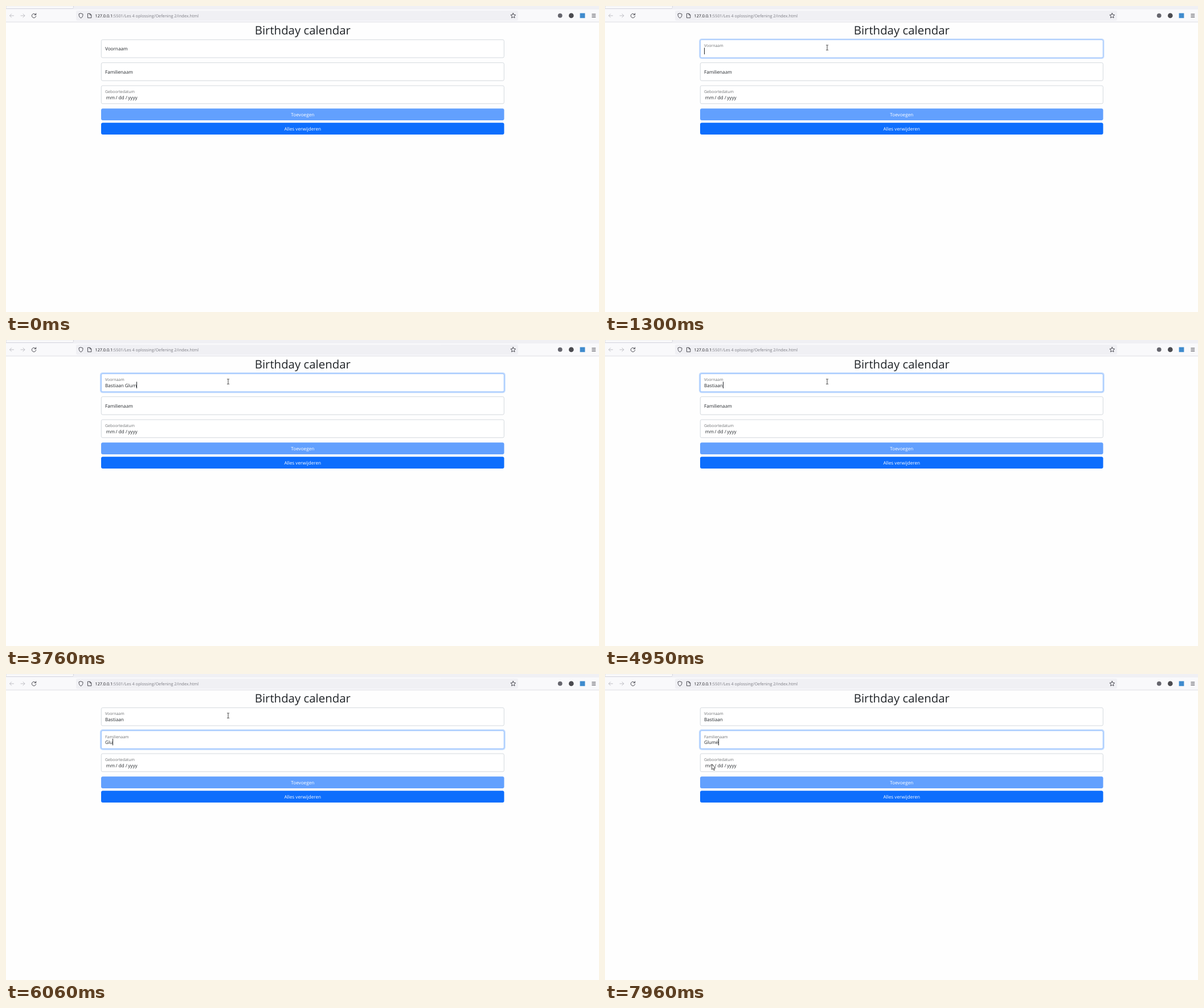
Animation, 1041 px wide and 538 px high, one loop 7.99 s. Source, as an HTML page:

```html
<!DOCTYPE html>
<html lang="nl">
<head>
<meta charset="utf-8">
<title>Birthday calendar</title>
<style>
  html, body { margin: 0; width: 100%; height: 100%; overflow: hidden; background: #fefefe; }
  svg { display: block; width: 100vw; height: 100vh; }
  text {
    font: 8.16px "Open Sans", "Noto Sans", sans-serif;
    fill: #212529;
    white-space: pre;
    text-rendering: geometricPrecision;
  }
  .title { font-size: 20.4px; }
  .url { font-size: 7.25px; fill: #7c7c84; }
  .url .host { fill: #15141a; }
  .mid { text-anchor: middle; }
  .button { fill: #fff; }
  .icon { fill: none; stroke: #4a4a52; stroke-width: 1; stroke-linecap: round; stroke-linejoin: round; }
  .faint { stroke: #bfbfc5; }
</style>
</head>
<body>
<svg id="stage" viewBox="0 0 1041 538" preserveAspectRatio="none">
  <rect width="1041" height="538" fill="#fefefe"/>

  <!-- browser bar -->
  <rect width="1041" height="6" fill="#f0f0f4"/>
  <rect y="6" width="1041" height="22" fill="#f9f9fb"/>
  <rect y="27.6" width="1041" height="1" fill="#dcdce3"/>
  <path d="M0 0H118.5V2.5Q118.5 4 117 4H0Z" fill="#fff" stroke="#cfcfd6" stroke-width=".8"/>
  <rect x="123" y="8.3" width="776" height="17.5" rx="2.4" fill="#f0f0f4"/>
  <path class="icon faint" d="M13.5 17H6.5M9.5 14L6.5 17L9.5 20M26 17H33M30 14L33 17L30 20"/>
  <path class="icon" d="M52.2 15.2A3.7 3.7 0 1 0 52.7 17.9M52.7 13V15.6H50"/>
  <path class="icon" d="M131.5 13L135 14.3C135.1 17.8 134 20 131.5 21.2C129 20 127.9 17.8 128 14.3Z"/>
  <path class="icon" d="M143.8 13.3H147.5L149.8 15.6V20.8H143.8ZM147.3 13.5V15.8H149.6"/>
  <text class="url" x="156.5" y="19.9"><tspan class="host">127.0.0.1</tspan>:5501/Les 4 oplossing/Oefening 2/index.html</text>
  <path id="star" class="icon" stroke-width=".9"/>
  <circle cx="972.7" cy="16.8" r="3.9" fill="#66666e"/>
  <circle cx="992.3" cy="16.9" r="4.3" fill="#4b4b50"/>
  <rect x="1007.6" y="12.6" width="8.8" height="8.6" fill="#3f8bcd"/>
  <path class="icon" d="M1028.8 14.3H1034.8M1028.8 16.9H1034.8M1028.8 19.5H1034.8" stroke-width=".9"/>

  <!-- page -->
  <text class="title mid" x="520.8" y="50.3">Birthday calendar</text>
  <g id="fields"></g>
  <text y="163.8"><tspan x="175.8">mm</tspan><tspan x="192.4">/</tspan><tspan x="197.4">dd</tspan><tspan x="209.7">/</tspan><tspan x="214.2">yyyy</tspan></text>
  <rect x="167" y="180.2" width="707.5" height="20.8" rx="3" fill="#62a0fe"/>
  <text class="button mid" x="520.8" y="194.1">Toevoegen</text>
  <rect x="167" y="205.2" width="707.5" height="20.8" rx="3" fill="#0d6efd"/>
  <text class="button mid" x="520.8" y="219.1">Alles verwijderen</text>
  <rect id="caret" width="1" height="11.6" fill="#212529"/>

  <g id="pointer">
    <path id="arrow" d="M.5 .5V10L2.6 8.1L4 11.4L5.5 10.8L4.1 7.6L6.7 7.4Z" fill="#fff" stroke="#222" stroke-width=".8"/>
    <path id="beam" d="M-2 -4.2H-.6L0 -3.7L.6 -4.2H2M0 -3.7V4M-2 4.5H-.6L0 4L.6 4.5H2" fill="none" stroke="#333" stroke-width=".9"/>
  </g>
</svg>
<script>
const LOOP = 7990, BLINK = 520;
const TOP = 59.3, STEP = 40.4, HEIGHT = 31.6, LEFT = 167.3, WIDTH = 707;
const FOCUS = [1180, 5150];

// Per field: the text and [time, letters shown].
const TYPING = [
  { text: 'Bastiaan Glumé', keys: [
    [1900, 1], [2050, 2], [2210, 3], [2370, 4], [2550, 5], [2720, 6], [2830, 7],
    [2950, 8], [3130, 9], [3290, 10], [3500, 11], [3660, 12], [3760, 13], [3830, 14],
    [4180, 13], [4340, 12], [4470, 11], [4600, 10], [4750, 9], [4950, 8]] },
  { text: 'Glumé', keys: [[5520, 1], [5750, 2], [6060, 3], [6200, 4], [6700, 5]] }
];

// Pointer stops: start, end, target x, target y.
const MOVES = [
  [440, 440, 899, 476], [470, 470, 690, 320], [500, 500, 527, 190],
  [540, 540, 458, 138], [790, 1110, 390, 73], [7220, 7950, 187, 158]
];

const $ = id => document.getElementById(id);
const clamp = v => Math.min(1, Math.max(0, v));
const ease = v => { const p = clamp(v); return p * p * (3 - 2 * p); };
const mix = (a, b, p) => a + (b - a) * p;
const blend = (a, b, p) => `rgb(${a.map((v, i) => Math.round(mix(v, b[i], p)))})`;

function add(parent, tag, attrs, text = '') {
  const node = document.createElementNS('http://www.w3.org/2000/svg', tag);
  for (const key in attrs) node.setAttribute(key, attrs[key]);
  node.textContent = text;
  return parent.appendChild(node);
}

function makeField(name, index) {
  const y = TOP + index * STEP, parent = $('fields');
  const box = { x: LEFT, y, width: WIDTH, height: HEIGHT, rx: 2.4 };
  return {
    y,
    glow: add(parent, 'rect', { fill: '#c2dbfe' }),
    box: add(parent, 'rect', { ...box, fill: '#fff', 'stroke-width': .9 }),
    label: add(parent, 'text', { x: 174 }, name),
    value: add(parent, 'text', { x: 174, y: y + 23.5 })
  };
}

const fields = ['Voornaam', 'Familienaam', 'Geboortedatum'].map(makeField);

$('star').setAttribute('d', 'M' + Array.from({ length: 10 }, (_, i) => {
  const r = i % 2 ? 2.2 : 4.6, a = i * Math.PI / 5;
  return `${(890.3 + r * Math.sin(a)).toFixed(2)} ${(17.2 - r * Math.cos(a)).toFixed(2)}`;
}).join('L') + 'Z');

function drawField(field, index, t) {
  const start = FOCUS[index] ?? Infinity, end = FOCUS[index + 1] ?? Infinity;
  const glow = ease((t - start) / 150) - ease((t - end) / 150);
  const lift = index === 2 ? 1 : ease((t - start) / 100);
  const spread = 2.4 * glow;

  const outer = {
    x: LEFT - spread, y: field.y - spread,
    width: WIDTH + 2 * spread, height: HEIGHT + 2 * spread,
    rx: 2.4 + spread, opacity: glow
  };
  for (const key in outer) field.glow.setAttribute(key, outer[key]);
  field.box.setAttribute('stroke', blend([208, 213, 219], [134, 183, 254], glow));
  field.label.setAttribute('y', field.y + mix(19.1, 12.9, lift));
  field.label.style.fontSize = mix(8.16, 6.94, lift) + 'px';
  field.label.style.opacity = mix(1, .65, lift);
}

function drawTyping(t) {
  const active = t >= FOCUS[1] ? 1 : 0;
  let lastChange = FOCUS[active];
  TYPING.forEach(({ text, keys }, i) => {
    const key = keys.filter(k => k[0] <= t).pop();
    const shown = key ? text.slice(0, key[1]) : '';
    if (fields[i].value.textContent !== shown) fields[i].value.textContent = shown;
    if (i === active && key) lastChange = key[0];
  });
  const { value, y } = fields[active];
  const width = value.textContent ? value.getComputedTextLength() : 0;
  const on = t >= FOCUS[0] && (t - lastChange) % (2 * BLINK) < BLINK;
  $('caret').setAttribute('x', Math.round(174 + width));
  $('caret').setAttribute('y', y + 14.1);
  $('caret').style.display = on ? '' : 'none';
}

function drawPointer(t) {
  let x = 0, y = 0;
  for (const [start, end, toX, toY] of MOVES) {
    if (t < start) break;
    const p = end > start ? ease((t - start) / (end - start)) : 1;
    x = mix(x, toX, p);
    y = mix(y, toY, p);
  }
  const overText = fields.slice(0, 2).some(f => y >= f.y && y <= f.y + HEIGHT);
  $('pointer').style.display = t < MOVES[0][0] ? 'none' : '';
  $('pointer').setAttribute('transform', `translate(${x} ${y})`);
  $('beam').style.display = overText ? '' : 'none';
  $('arrow').style.display = overText ? 'none' : '';
}

const began = performance.now();
function render() {
  const t = (performance.now() - began) % LOOP;
  fields.forEach((field, i) => drawField(field, i, t));
  drawTyping(t);
  drawPointer(t);
  requestAnimationFrame(render);
}
render();
</script>
</body>
</html>
```
